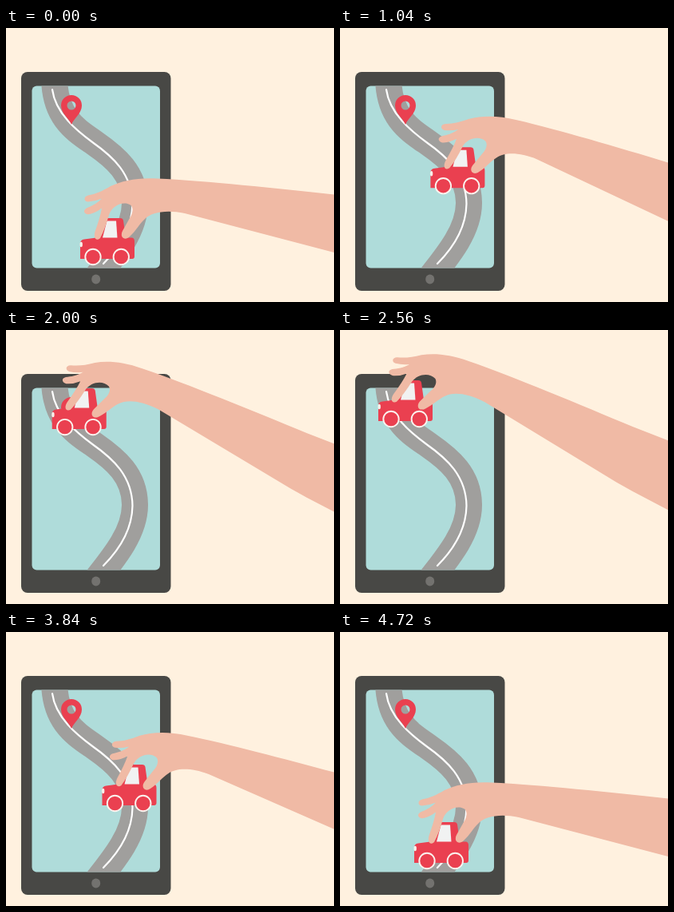
Recreate the animation shown at these times as an HTML page. Size 411 by 343 pixels, loop 4.8 s.

```html
<!DOCTYPE html>
<html lang="en">
<head>
<meta charset="utf-8">
<title>Car on a map</title>
<style>
  html, body { margin: 0; width: 100%; height: 100%; overflow: hidden; background: #fff1df; }
  svg { display: block; width: 100%; height: 100%; }
</style>
</head>
<body>
<svg viewBox="0 0 411 343">
  <defs>
    <clipPath id="screen"><rect x="32.500" y="72.500" width="160.500" height="228" rx="6"/></clipPath>
  </defs>

  <rect x="19" y="55" width="187.500" height="274" rx="8" fill="#484845"/>
  <ellipse cx="112.700" cy="314.500" rx="5.500" ry="6" fill="#73726f"/>
  <g clip-path="url(#screen)">
    <rect x="32" y="72" width="162" height="230" fill="#afdcda"/>
    <g fill="none">
      <path stroke="#a09f9d" stroke-width="33" d="M60.500 60C60 112 88 128 111 144C137 162 161 182 161.500 218C162 251 140 280 103 325"/>
      <path stroke="#fff" stroke-width="2.200" stroke-linecap="round" d="M58 77C62 107 89 129 109 143.500C134 161 158 183 158.500 220C158 250 142 275 122 295"/>
    </g>
  </g>
  <path id="pin" fill="#ea4050" fill-rule="evenodd" d="M82 121C79 113 69 107 69 97A13 13 0 0 1 95 97C95 107 85 113 82 121ZM87.500 97A5.500 5.500 0 1 0 76.500 97A5.500 5.500 0 1 0 87.500 97Z"/>

  <g id="car" fill="#ea4050">
    <path d="M93 289V270Q93 265 98 264.500L117 262L124 241Q125 238 128 238H143Q146.500 238 147 241L150 262.500H158Q161 263 161 267V286Q161 289 158 289Z"/>
    <path fill="#f1f2f2" d="M126.500 241.500H138L139.500 262.500H121Z"/>
    <ellipse cx="94.200" cy="271" rx="1.700" ry="3.200" fill="#f8f1ea"/>
    <g stroke="#fbf3ee" stroke-width="1.900">
      <circle cx="109" cy="286.500" r="9.700"/>
      <circle cx="144.300" cy="286.500" r="9.700"/>
    </g>
  </g>

  <path id="hand" fill="#f0baa5" d="M560 221L411 208.500C340 201 250 191 190 188.500
    C165 187 146 191 131 198C121 204 112 208 103 209.500C97 211 97 217 103 217.500Q112 217 120 213.500
    C114 220 107 223 101 225.500C95 229 99 234 105 233Q113 231 120 225.500
    Q118 237 111.500 255C109 264 114 267 118 263Q124 252 129 234
    C133 222 147 216 156 221.500C160 225 159 232 155 238L146 254C142 262 149 267 155 261
    C163 254 167 245 174 239C182 231 200 227 224 232L411 281L433 286L484 296L560 312Z"/>
</svg>
<script>
  const FRAME = 40, LOOP = 4800, TURN = 2360;
  const PIVOT = "111 257";
  const PIN_GONE = 2040;

  // time, x, y, hand angle along the way up the road
  const route = [
    [0, 0, 0, 0],
    [240, 12, -17, 2.4],
    [640, 29, -48, 6.3],
    [880, 27.5, -72, 9],
    [1120, 16, -97, 11.3],
    [1480, -4.7, -131.3, 14],
    [1680, -16.5, -147, 15.2],
    [1920, -30.5, -160, 16],
    [2160, -45, -175, 16.6],
    [TURN, -58, -185, 17.1]
  ];

  const el = id => document.getElementById(id);
  const car = el("car"), hand = el("hand"), pin = el("pin");

  function slope(i, k) {
    const a = route[Math.max(i - 1, 0)];
    const b = route[Math.min(i + 1, route.length - 1)];
    return (b[k] - a[k]) / (b[0] - a[0]);
  }

  // cubic Hermite through the route
  function at(u, k) {
    let i = 0;
    while (i < route.length - 2 && u > route[i + 1][0]) i++;
    const a = route[i], b = route[i + 1], h = b[0] - a[0];
    const s = (u - a[0]) / h, r = 1 - s;
    return r * r * ((1 + 2 * s) * a[k] + s * h * slope(i, k))
         + s * s * ((1 + 2 * r) * b[k] - r * h * slope(i + 1, k));
  }

  function draw(now) {
    const t = Math.min(Math.floor((now % LOOP) / FRAME) * FRAME, 2 * TURN);
    const u = TURN - Math.abs(t - TURN);
    const move = `translate(${at(u, 1)} ${at(u, 2)})`;
    car.setAttribute("transform", move);
    hand.setAttribute("transform", `${move} rotate(${at(u, 3)} ${PIVOT})`);
    pin.setAttribute("visibility", u > PIN_GONE ? "hidden" : "visible");
  }

  const start = performance.now();
  function tick() {
    draw(performance.now() - start);
    requestAnimationFrame(tick);
  }
  tick();
</script>
</body>
</html>
```
